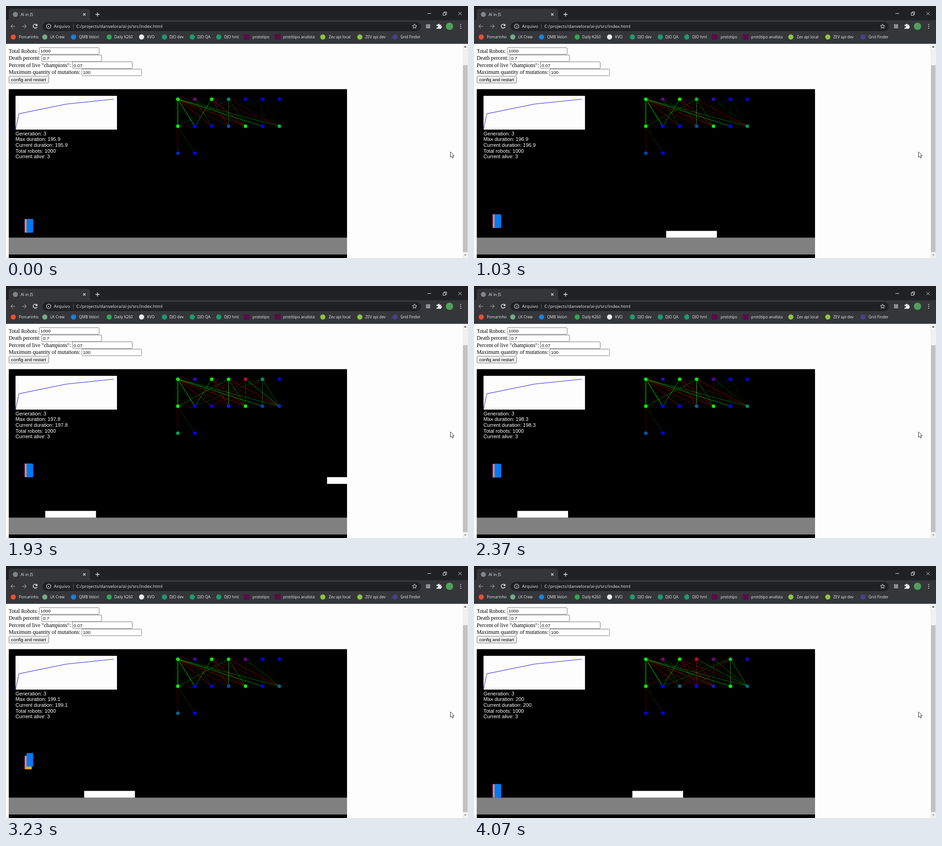
An HTML page with a canvas for the animation above (4110 ms loop, 1012 px wide and 553 px high).

```html
<!DOCTYPE html>
<html lang="en">
<head>
<meta charset="utf-8">
<title>AI in JS</title>
<style>
html, body { margin: 0; width: 100%; height: 100%; overflow: hidden; background: #fdfdfd }
canvas { display: block }
</style>
</head>
<body>
<canvas id="stage" width="1012" height="553"></canvas>
<script>
const ctx = document.getElementById('stage').getContext('2d');
const LOOP = 4110, FRAME = 33.35, LAST_FRAME = 122;
const UI = '"Open Sans", sans-serif', ARIAL = '"Liberation Sans", Arial, sans-serif',
  TIMES = '"Liberation Serif", "Times New Roman", serif';

function rect(x, y, w, h, color) {
  ctx.fillStyle = color;
  ctx.fillRect(x, y, w, h);
}
function round(x, y, w, h, r, fill, stroke) {
  ctx.beginPath();
  ctx.roundRect(x, y, w, h, r);
  if (fill) { ctx.fillStyle = fill; ctx.fill(); }
  if (stroke) { ctx.strokeStyle = stroke; ctx.lineWidth = 1; ctx.stroke(); }
}
function dot(x, y, r, color) {
  ctx.beginPath();
  ctx.arc(x, y, r, 0, 7);
  ctx.fillStyle = color;
  ctx.fill();
}
function path(d, color, width = 1.3) {
  ctx.strokeStyle = color;
  ctx.lineWidth = width;
  ctx.stroke(new Path2D(d));
}
function shape(d, color) {
  ctx.fillStyle = color;
  ctx.fill(new Path2D(d));
}
function text(str, x, y, size, family, color) {
  ctx.font = `${size}px ${family}`;
  ctx.fillStyle = color;
  ctx.fillText(str, x, y);
}

// Browser window

const bookmarks = [
  [16, 28, 'Pomarinho', '#e8502f'], [85, 97, 'LK Crew', '#6fae86'],
  [148, 160, 'QMB Velori', '#1f7fd6'], [226, 237, 'Daily K260', '#2fa84f'],
  [297, 309, 'KVO', '#e8eaed'], [347, 358, 'DJO dev', '#1f9a6a'],
  [408, 419, 'DJO QA', '#1f9a6a'], [466, 478, 'DJO hml', '#1f9a6a'],
  [527, 540, 'prototipo', '#5b0a4c', true], [595, 607, 'protótipo analista', '#5b0a4c', true],
  [694, 707, 'Zev api local', '#8bc53f'], [775, 787, 'ZEV api dev', '#8bc53f'],
  [852, 864, 'Grid Finder', '#4a3f8a']
];

function drawBrowser() {
  const light = '#e8eaed';
  rect(0, 0, 1012, 31, '#202124');
  rect(0, 31, 1012, 52, '#35363a');
  shape('M0 31Q6 31 6 25V12Q6 6 12 6H178Q184 6 184 12V25Q184 31 190 31Z', '#35363a');
  dot(20.5, 18.5, 5.5, '#80858a');
  text('AI in JS', 32, 22, 8.8, UI, light);
  path('M169 16l5 5m0-5l-5 5M196 18.5h9M200.5 14v9', light);
  path('M923 16.5h8M957.500 15h5.500v5.500h-5.500zM959.500 15v-2h5.500v5.500h-2M991 13l7 7m0-7l-7 7', light, 1);

  path('M20 44.500h-9m4-4.500l-4.500 4.500l4.500 4.500', '#898b8f');
  path('M35 44.500h9m-4-4.500l4.500 4.500l-4.500 4.500', '#898b8f');
  path('M67.500 42a4.300 4.300 0 1 0 .5 3.500M68 39.500v3.500h-3.500', light, 1.5);
  round(80, 35, 829, 20, 10, '#202124');
  path('M98.300 44.500a4.800 4.800 0 1 0-9.600 0a4.800 4.800 0 1 0 9.600 0M93.500 44v3M93.500 41.500v1', light, 1.1);
  text('Arquivo', 105, 48, 9.8, UI, light);
  rect(147, 39, 1, 11, '#5f6368');
  text('C:/projects/danvelora/ai-js/src/index.html', 154, 48, 9.8, UI, light);
  path('M895 39.500l1.400 3.400 3.600.3-2.800 2.300.9 3.600-3.100-1.900-3.100 1.900.9-3.600-2.800-2.300 3.600-.3z', light, 1);
  rect(920, 40, 9, 9, '#8a9097');
  shape('M943 41h3a2 2 0 1 1 4 0h3v3a2 2 0 1 1 0 4v2h-10v-3a2 2 0 1 0 0-3z', light);
  dot(971.5, 44.5, 8, '#4fa05b');
  for (const y of [40.5, 44.5, 48.5]) dot(996, y, 1.1, light);

  for (const [iconX, x, label, color, square] of bookmarks) {
    if (square) rect(iconX - 6, 62, 12, 12, color);
    else dot(iconX, 68, 5.7, color);
    text(label, x, 71, 8.4, UI, light);
  }
}

function drawForm() {
  rect(0, 83, 1012, 470, '#fdfdfd');
  const fields = [['Total Robots:', 73, '1000'], ['Death percent:', 78.5, '0.7'],
    ['Percent of live "champions":', 145.5, '0.07'], ['Maximum quantity of mutations:', 166, '100']];
  fields.forEach(([label, x, value], i) => {
    const y = 91.5 + i * 15.6;
    text(label, 6, y + 11, 11.86, TIMES, '#000');
    round(x, Math.floor(y) + .5, 131, 14.5, 1.5, '#fff', '#767676');
    text(value, x + 2.5, y + 10.8, 9.88, ARIAL, '#000');
  });
  round(6.5, 154, 87, 15, 2, '#efefef', '#767676');
  text('config and restart', 11.5, 165, 9.88, ARIAL, '#000');

  rect(1000, 83, 12, 470, '#f1f1f1');
  rect(1001, 130, 10, 410, '#c1c1c1');
  shape('M1003 91h6l-3-3.500z', '#505050');
  shape('M1003 545h6l-3 3.500z', '#a0a0a0');
}

// Game world: 1000 units wide, floor at 440, stepped 120 times a second

const SCALE = .741, FLOOR = 440, STEPS_PER_MS = .12, SPEED = 4;

// arrival time at the left edge, shape signal, raised
const obstacles = [
  [257, 0], [554.25, -.4], [840, -.5], [1170, -.2], [1516.75, -.55], [1957, -.75],
  [2165.25, 0, true], [2400, -.3], [2640, -.6], [2915.5, 0], [3285.75, -.4],
  [3560, -.6], [4010, -.45], [4185, -.1]
];

const jumpTimes = (a, b, c) =>
  [-250, 90, 353, 690, 1010, a, 1800, 2230, b, 2785, c, 3430, 3788, 4085];
const robots = [
  { x: 45, color: '#3300ff', jumps: jumpTimes(1297, 2503, 3172) },
  { x: 48, color: '#ffa500', jumps: jumpTimes(1422, 2503, 3172) },
  { x: 52.5, color: '#0078ff', jumps: jumpTimes(1422, 2520, 3163) }
];

function heightOf(robot, t) {
  const start = robot.jumps.filter(j => j <= t).pop();
  const k = Math.round((t - start) * STEPS_PER_MS);
  return k > 32 ? 0 : 15 * k - k * (k - 1) / 2;
}

// Neural network

const inputWeights = [
  [.95, .95, -.6, -.4, -.6, .65, .45],
  [0, 0, -.7, -.2, -.5, 0, 0],
  [0, .6, 0, -.65, -.7, 0, -.3],
  [.45, .1, -.1, .85, .5, 0, -.6],
  [.3, 0, .5, 0, -.4, 0, -.9],
  [.2, .4, -.5, -.5, 0, .85, .75],
  [0, 0, .1, 0, .2, .2, .1]
];
const outputWeights = [[-.35, .25]];
const clamp = v => Math.max(0, Math.min(1, v));

function think(t) {
  const near = obstacles.map(([at, signal]) => ({ x: (at - t) * SPEED, signal }))
    .filter(o => o.x > -320 && o.x < 1040);
  const sense = o => !o ? 0 : o.x < -150 ? -.8 : Math.min(1, 1 - (o.x + 63) / 2300);
  const d1 = sense(near[0]), d2 = sense(near[1]);
  const s1 = near[0]?.signal ?? 0, s2 = near[1]?.signal ?? 0;
  return [
    [1, -.52 + .0026 * heightOf(robots[0], t), 1, d1, s1, d2, s2],
    [1, 0, clamp(-.55 * d1), clamp(.6 * d1 + .55 * s1), d1 < 0 ? .1 : 1,
      clamp(3.8 * (d2 - .5)), clamp(.75 + .8 * s1)],
    [d1 < 0 ? 0 : clamp(.15 - .65 * s1), 0]
  ];
}

function drawNetwork(t) {
  const layers = think(t);
  const nodeX = i => 500 + 50 * i, nodeY = layer => 30 + 80 * layer;
  ctx.lineWidth = 1 / SCALE;
  [inputWeights, outputWeights].forEach((weights, layer) => weights.forEach((row, i) => row.forEach((w, j) => {
    if (!w) return;
    const signal = w * layers[layer][i];
    const alpha = Math.max(Math.abs(signal), .15 * Math.abs(w));
    ctx.strokeStyle = signal < 0 ? `rgba(255,0,0,${alpha})` : `rgba(0,255,0,${alpha})`;
    ctx.beginPath();
    ctx.moveTo(nodeX(i), nodeY(layer));
    ctx.lineTo(nodeX(j), nodeY(layer + 1));
    ctx.stroke();
  })));
  layers.forEach((values, layer) => values.forEach((v, i) => {
    const level = Math.round(255 * Math.abs(v));
    dot(nodeX(i), nodeY(layer), 5.2,
      v < 0 ? `rgb(${level},0,${255 - level})` : `rgb(0,${level},${255 - level})`);
  }));
}

function drawGame(t) {
  ctx.save();
  ctx.translate(6, 182.3);
  ctx.scale(SCALE, SCALE);
  ctx.beginPath();
  ctx.rect(0, 0, 1000, 501);
  ctx.clip();
  rect(0, 0, 1000, 501, '#000');
  rect(0, FLOOR, 1000, 50, '#808080');

  for (const [at, , raised] of obstacles)
    rect((at - t) * SPEED, raised ? 320 : FLOOR - 20, 150, 20, '#fff');
  for (const robot of robots)
    rect(robot.x, FLOOR - 40 - heightOf(robot, t), 20, 40, robot.color);

  rect(20, 20, 300, 100, '#fdfdfd');
  path('M20 120L30 73L170 44.500L310 30', '#2a1fd8', 1.4);
  const seconds = Math.round((195.9 + t / 1000) * 10) / 10;
  ['Generation: 3', 'Max duration: ' + seconds, 'Current duration: ' + seconds,
    'Total robots: 1000', 'Current alive: 3']
    .forEach((line, i) => text(line, 20, 137 + 17 * i, 15, ARIAL, '#fff'));
  drawNetwork(t);
  ctx.restore();
}

function drawCursor() {
  const arrow = 'M973.500 320v12l2.700-2.500 2 4.300 2-.9-2-4.200h3.600z';
  shape(arrow, '#fff');
  path(arrow, '#333', 1);
}

function draw() {
  const frame = Math.min(LAST_FRAME, Math.floor((performance.now() % LOOP + 5) / FRAME));
  const t = Math.round(frame * FRAME / 10) * 10;
  drawBrowser();
  drawForm();
  drawGame(t);
  drawCursor();
  requestAnimationFrame(draw);
}
draw();
</script>
</body>
</html>
```
